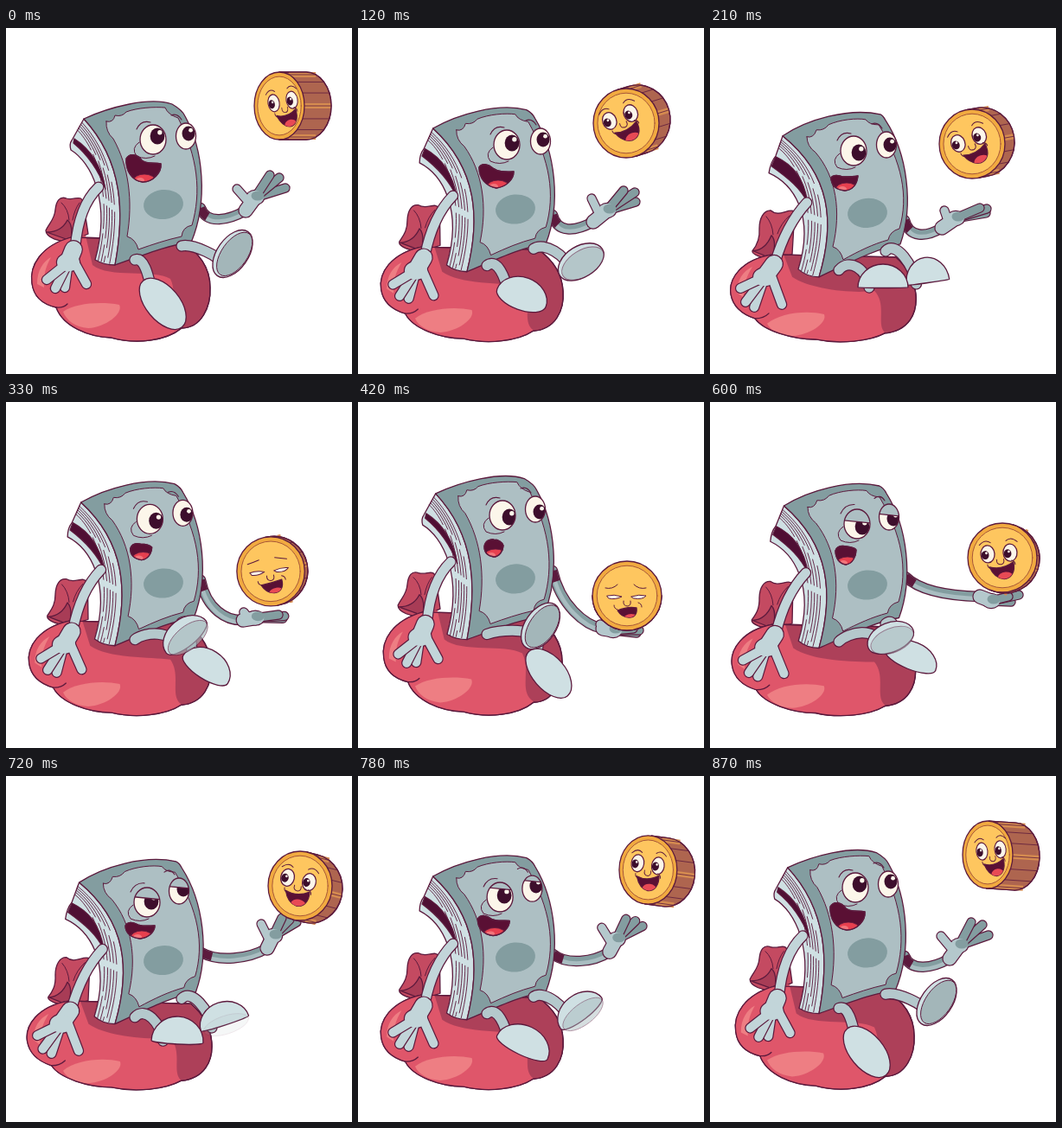
An HTML page that plays this animation: 400x400 px, repeating every 900 ms.

```html
<!DOCTYPE html>
<html>
<head>
<meta charset="utf-8">
<style>
html, body { margin: 0; width: 100%; height: 100%; overflow: hidden; background: #fff; }
svg { display: block; width: 100vw; height: 100vh; }
</style>
</head>
<body>
<svg id="stage" viewBox="0 0 400 400" stroke-linecap="round" stroke-linejoin="round"></svg>
<script>
const LOOP = 900, STEP = 30;
const INK = '#5c1a3d', DARK = '#839da0', MID = '#adbfc3', LIGHT = '#cfe0e3', SHADE = '#a3b6b9';
const TIMES = [0, 120, 210, 420, 600, 720, 870];
const stage = document.getElementById('stage');
const nums = s => s.match(/-?\d+(\.\d+)?/g).map(Number);

// Blend two paths of the same structure
function mix(a, b, k) {
  const to = nums(b);
  let i = 0;
  return a.replace(/-?\d+(\.\d+)?/g, n => (+n + (to[i++] - n) * k).toFixed(2));
}

// Cyclic smooth curve through one value per entry in TIMES, without overshoot
function curve(v, t) {
  const n = TIMES.length;
  const at = i => v[(i + n) % n];
  const when = i => TIMES[(i + n) % n] + LOOP * Math.floor(i / n);
  const slope = i => (at(i + 1) - at(i)) / (when(i + 1) - when(i));
  const tangent = i => {
    const a = slope(i - 1), b = slope(i);
    return a * b <= 0 ? 0 : 2 * a * b / (a + b);
  };
  let i = n - 1;
  while (TIMES[i] > t) i--;
  const h = when(i + 1) - when(i), u = (t - when(i)) / h, w = 1 - u;
  return at(i) * w * w * (1 + 2 * u) + at(i + 1) * u * u * (3 - 2 * u)
    + h * u * w * (tangent(i) * w - tangent(i + 1) * u);
}
const pose = (rows, t) => rows[0].map((_, c) => curve(rows.map(r => r[c]), t));

const path = (d, fill = 'none', stroke = INK, w = 1.3, more = '') =>
  `<path d="${d}" fill="${fill}" stroke="${stroke}" stroke-width="${w}" ${more}/>`;
const oval = (x, y, rx, ry, fill, stroke = 'none', w = 1.3, more = '') =>
  `<ellipse cx="${x}" cy="${y}" rx="${rx}" ry="${ry}" fill="${fill}" stroke="${stroke}" stroke-width="${w}" ${more}/>`;
const limb = (d, w, fill) => path(d, 'none', INK, w + 2.4) + path(d, 'none', fill, w);

// Resting and squashed shapes: [up, down]
const BODY = {
  face: ['M90,105 C118,92 165,79 192,88 Q204,95 207,102 C228,140 234,200 214,248 C190,250 160,262 126,274 C137,215 136,155 90,105 Z',
    'M84,125 C112,106 160,92 197,100 Q200,101 203,107 C228,145 236,205 220,250 C190,256 160,272 126,288 C145,225 140,170 84,125 Z'],
  panel: ['M116,108 Q124,110 126,101 Q134,103 139,97 C152,92 172,91 184,92 Q187,100 199,104 C222,150 226,190 215,228 Q204,230 203,241 C185,245 170,250 153,256 Q150,244 140,241 C147,200 142,160 124,128 Q115,120 116,108 Z',
    'M112,126 Q120,128 123,118 Q132,119 137,112 C150,106 170,104 180,106 Q184,112 195,112 C222,155 230,195 219,232 Q208,235 206,245 C188,250 172,258 154,268 Q151,256 142,253 C152,212 146,172 122,144 Q112,137 112,126 Z'],
  pages: ['M90,105 L76,130 Q73,134 75,141 C98,155 122,200 103,268 Q113,274 126,274 C137,215 136,155 90,105 Z',
    'M84,125 L76,148 Q70,155 68,168 C95,180 122,215 102,279 Q112,288 126,288 C145,225 140,170 84,125 Z'],
  gap: ['M79,128 C96,139 110,158 115,186 C107,165 95,147 78,133 Z',
    'M76,149 C95,158 108,172 113,202 C104,185 92,175 71,160 Z'],
  left: ['M82,119 C100,136 124,190 105,269', 'M79,140 C104,160 124,215 104,281'],
  right: ['M89,107 C130,152 135,210 123,273', 'M83,127 C135,168 141,220 122,287'],
  bag: ['M75,242 C40,252 27,275 30,295 C32,312 45,320 58,323 C66,345 95,357 122,358 C150,366 185,362 203,347 C226,347 237,322 236,300 C236,275 222,258 200,245 Z',
    'M72,262 C36,268 21,290 24,308 C27,325 40,332 52,336 C62,350 95,360 122,360 C150,366 185,362 202,353 C230,350 240,330 238,308 C236,290 226,275 215,265 Z'],
  front: ['M75,242 C40,252 27,275 30,295 C32,312 45,320 58,323 C66,345 95,357 122,358 C150,365 185,361 203,346 C185,335 200,310 190,290 C170,278 120,290 100,274 L92,240 Z',
    'M72,262 C36,268 21,290 24,308 C27,325 40,332 52,336 C62,350 95,360 122,360 C150,366 185,362 202,352 C192,342 205,320 190,304 C165,308 115,302 95,288 L85,262 Z'],
  shine: ['M66,328 C80,318 110,316 131,320 C136,330 115,346 95,347 C80,346 70,338 66,328 Z',
    'M66,342 C80,330 110,326 132,331 C136,341 115,355 95,356 C80,355 70,350 66,342 Z'],
  glint: ['M36,296 C36,280 43,270 52,265 C46,276 43,285 44,300 Z', 'M31,306 C31,292 38,281 49,276 C42,288 38,297 39,312 Z'],
  crease: ['M58,323 Q66,324 71,319', 'M52,336 Q62,336 68,330'],
  knot: ['M75,247 C62,248 46,242 46,234 C50,225 56,222 57,210 C58,200 62,194 70,197 C80,200 88,190 90,205 L95,238 Z',
    'M72,268 C60,266 48,262 49,258 C54,252 58,245 57,232 C57,220 62,211 70,211 C80,220 90,208 98,212 L95,262 Z'],
  fold: ['M47,236 C58,236 66,232 71,222 C76,226 77,234 75,246 Z', 'M50,258 C60,257 67,250 71,240 C76,245 75,254 72,267 Z'],
  pleat: ['M64,202 Q72,209 73,222 M85,202 Q79,210 77,222', 'M65,218 Q72,226 73,239 M92,217 Q82,226 78,238'],
  arm: ['M107,184 Q84,206 80,254', 'M112,202 Q88,228 75,272']
};
const REST = ['78,256 72,271 47,291 57,301 68,300 93,296', '74,273 63,288 35,301 41,317 51,323 83,320'];

// eye x, y, pupil x, y for both eyes, then lid
const LOOK = [
  [170, 129, 175, 125, 208, 125, 211, 122, 0], [172, 135, 178, 133, 211, 131, 214, 129, 0],
  [166, 142, 172, 144, 204, 135, 208, 135, 0], [167, 131, 175, 133, 205, 124, 210, 127, 0],
  [170, 141, 176, 144, 207, 133, 212, 135, .42], [163, 146, 168, 145, 200, 133, 205, 131, .36],
  [168, 129, 173, 125, 206, 125, 209, 122, 0]
];
const MOUTH = [
  'M139,151 C143,144 152,146 157,153 C163,158 171,155 179,157 C180,167 170,178 158,178 C146,177 138,165 139,151 Z',
  'M140,161 C143,156 150,157 156,162 C163,167 171,166 180,166 C180,176 170,184 160,185 C148,183 140,174 140,161 Z',
  'M140,173 C143,169 148,170 154,172 C160,172 166,172 171,171 C170,180 166,187 156,188 C146,187 140,182 140,173 Z',
  'M146,167 C147,161 152,158 157,159 C162,159 167,162 168,166 C168,172 163,179 157,179 C150,178 146,174 146,167 Z',
  'M145,172 C147,166 153,166 158,167 C163,168 167,168 169,171 C169,178 165,187 157,188 C150,187 145,181 145,172 Z',
  'M138,173 C141,168 147,169 153,172 C160,174 166,173 172,173 C172,180 165,187 155,188 C145,187 138,182 138,173 Z',
  'M139,151 C143,144 152,146 157,153 C163,158 171,155 179,157 C180,167 170,178 158,178 C146,177 138,165 139,151 Z'
];
// shoulder, two controls
const REACH = [
  [225, 208, 232, 228, 258, 222], [225, 216, 230, 237, 250, 236], [225, 222, 230, 243, 250, 242],
  [225, 195, 234, 235, 262, 258], [226, 202, 242, 218, 275, 224], [226, 204, 245, 215, 280, 212],
  [225, 208, 232, 227, 258, 222]
];
// wrist, palm, three finger tips, thumb
const GRIP = [
  [277, 211, 288, 196, 305, 170, 316, 173, 323, 185, 267, 186],
  [272, 224, 288, 211, 307, 188, 320, 190, 321, 201, 270, 197],
  [268, 231, 284, 220, 312, 208, 320, 209, 319, 214, 271, 211],
  [283, 262, 295, 264, 318, 262, 325, 264, 322, 267, 280, 257],
  [312, 225, 325, 230, 345, 225, 357, 223, 348, 231, 311, 223],
  [302, 199, 309, 185, 319, 164, 328, 166, 336, 169, 295, 171],
  [277, 211, 288, 196, 302, 169, 315, 172, 322, 184, 267, 185]
];
// x, y, angle, half length, top bulge, bottom bulge, sole
const FOOT_A = [
  [181, 319, 50, 35, 20, 19, 0], [189, 312, 20, 30, 24, 14, 0], [200, 300, 0, 29, 27, 0, 0],
  [211, 259, -56, 30, 18, 18, 1], [209, 274, -22, 28, 19, 15, .5], [198, 307, 3, 30, 29, 3, 0],
  [181, 319, 50, 35, 20, 19, 0]
];
const FOOT_B = [
  [262, 261, -55, 31, 18, 18, 1], [258, 271, -32, 29, 19, 17, .6], [252, 294, -8, 25, 29, 0, 0],
  [220, 314, 49, 34, 20, 18, 0], [232, 299, 22, 31, 22, 10, 0], [253, 286, -18, 29, 25, 2, .1],
  [262, 261, -55, 31, 18, 18, 1]
];
// face x, y, rx, ry, edge dx, dy, eye midpoint x, y, tilt, closed
const COIN = [
  [316, 90, 29, 39, 31, 0, 320, 85, -10, 0], [310, 110, 38, 40, 13, -4, 303, 103, -20, 0],
  [303, 134, 38, 40, 11, -2, 299, 129, -20, 0], [311, 224, 40, 40, 0, 0, 310, 223, 0, 1],
  [338, 180, 40, 40, 3, 1, 334, 175, -4, 0], [340, 127, 37, 40, 12, 3, 338, 120, 12, 0],
  [321, 91, 29, 39, 31, 2, 325, 86, -6, 0]
];

function eye(id, x, y, rx, ry, px, py, pr, lid, skin) {
  const top = y - ry + 2 * ry * lid;
  const cover = lid > .02 ? path(`M${x - 30},${y - 40} H${x + 30} V${top + 3} L${x - 30},${top - 3} Z`, skin) : '';
  return `<clipPath id="${id}">${oval(x, y, rx, ry, '#000')}</clipPath>`
    + oval(x, y, rx, ry, '#fcf6ea')
    + `<g clip-path="url(#${id})">${oval(px, py, pr * .88, pr, '#3d0e2c')}`
    + oval(px + pr * .3, py - pr * .45, pr * .28, pr * .28, '#fcf6ea') + cover + '</g>'
    + oval(x, y, rx, ry, 'none', INK);
}

function hand(p, r, w, fill, back) {
  const [wx, wy, x, y] = p;
  const line = i => `M${x},${y} L${p[i]},${p[i + 1]}`;
  const wrist = `M${wx},${wy} L${x},${y}`, thumb = `M${(wx + x) / 2},${(wy + y) / 2} L${p[10]},${p[11]}`;
  const fingers = [8, 6, 4].map(i => limb(line(i), w, fill)).join('');
  return path(wrist, 'none', INK, r * 1.5 + 2.4) + oval(x, y, r, r * .8, INK, INK, 2.4) + fingers
    + limb(thumb, w, back) + path(wrist, 'none', back, r * 1.5) + oval(x, y, r, r * .8, back)
    + (fill === back ? '' : oval(x + 3, y - 2, r * .75, r * .55, fill));
}

function foot([x, y, a, l, top, low, sole]) {
  const d = `M${-l},0 A${l},${top} 0 0 1 ${l},0 A${l},${Math.max(low, .5)} 0 0 1 ${-l},0 Z`;
  return `<g transform="translate(${x} ${y}) rotate(${a})">${path(d, LIGHT)}`
    + oval(1, 2, l - 2, Math.max(1, (top + low) / 2 - 3), SHADE, INK, .9, `opacity="${sole}"`) + '</g>';
}

function leg(hx, hy, lift, f) {
  const r = f[2] * Math.PI / 180, k = f[3] * .55;
  const ax = f[0] - Math.cos(r) * k, ay = f[1] - Math.sin(r) * k;
  return limb(`M${hx},${hy} C${hx + 12},${hy - lift} ${ax - 3},${ay - lift - 8} ${ax},${ay}`, 11, '#b4c8cc');
}

function coin(t) {
  const [x, y, rx, ry, ex, ey, fx, fy, tilt, shut] = pose(COIN, t);
  const a = Math.atan2(-ry * ex, rx * ey);
  const rim = q => [x + rx * Math.cos(q), y + ry * Math.sin(q)];
  const [ax, ay] = rim(a), [bx, by] = rim(a + Math.PI);
  const edge = `M${ax},${ay} L${ax + ex},${ay + ey} A${rx},${ry} 0 0 1 ${bx + ex},${by + ey} L${bx},${by} Z`;
  let ribs = '';
  for (let i = 1; i < 8; i++) {
    const [px, py] = rim(a + i * Math.PI / 8);
    const d = `M${px},${py} l${ex},${ey}`;
    if (i % 3 === 1) ribs += path(d, 'none', '#d58b50', 6, 'stroke-linecap="butt"');
    ribs += path(d, 'none', INK, .8);
  }
  const gold = '#fec65f', s = .82 + .18 * Math.min(1, (rx - 29) / 9);
  const eyes = shut > .6
    ? path('M-22,1 Q-14,-1 -5,2 Q-13,6 -20,4 Z M6,2 Q15,-1 23,1 Q19,6 9,4 Z', '#fcf6ea', INK, 1)
    : eye('c1', -13, 0, 8, 10, -16, 1, 5, shut * .8, gold) + eye('c2', 13, 0, 8, 10, 10, 1, 5, shut * .8, gold);
  const grin = mix('M-12,15 Q2,20 16,11 C18,23 12,30 4,30 C-4,29 -9,23 -12,15 Z',
    'M-10,18 Q2,13 12,15 C13,22 9,27 3,26 C-3,26 -7,23 -10,18 Z', shut);
  return path(edge, '#ae654f') + ribs + path(edge)
    + oval(x, y, rx, ry, '#f1aa40', INK) + oval(x, y, rx * .87, ry * .87, gold, '#a75638', 1)
    + `<g transform="translate(${fx} ${fy}) rotate(${tilt}) scale(${s} 1)">${eyes}`
    + path(mix('M-22,-11 Q-15,-18 -9,-13 M9,-14 Q15,-19 22,-12', 'M-24,-8 Q-16,-6 -10,-12 M9,-12 Q15,-6 23,-8', shut), 'none', INK, 1)
    + path('M-3,7 Q-4,13 2,13 Q6,12 5,7', gold, INK, 1)
    + `<clipPath id="grin"><path d="${grin}"/></clipPath>` + path(grin, '#5a1034')
    + oval(6, 28, 9, 6, '#e84a55', 'none', 1, 'clip-path="url(#grin)"')
    + path('M-14,12 Q-14,16 -10,17 M14,9 Q18,10 18,14', 'none', INK, 1) + '</g>';
}

function draw(t) {
  const b = (1 - Math.cos(4 * Math.PI * t / LOOP)) / 2;
  const part = n => mix(BODY[n][0], BODY[n][1], b);
  const [lx, ly, px, py, rx, ry, qx, qy, lid] = pose(LOOK, t);
  const mouthNums = pose(MOUTH.map(nums), t);
  let i = 0;
  const mouth = MOUTH[0].replace(/\d+/g, () => mouthNums[i++].toFixed(2));
  const [tx, ty] = mouthNums.slice(18, 20);
  const grip = pose(GRIP, t), r = pose(REACH, t);
  const reach = `M${r[0]},${r[1]} C${r[2]},${r[3]} ${r[4]},${r[5]} ${grip[0]},${grip[1]}`;
  const fa = pose(FOOT_A, t), fb = pose(FOOT_B, t);
  const left = part('left'), right = part('right');
  const sheets = [.08, .28, .46, .64, .82].map((k, n) =>
    path(mix(left, right, k), 'none', INK, .9, `stroke-dasharray="${28 + n * 9} ${6 + n * 2} ${50 - n * 6} 9"`)).join('');
  const face = part('face');

  stage.innerHTML =
    path(part('knot'), '#c44a61') + path(part('fold'), '#a83c56') + path(part('pleat'), 'none', INK, 1)
    + path(part('bag'), '#ad4059') + path(part('front'), '#df566a', 'none')
    + path(part('shine'), '#ee7e83', 'none') + path(part('glint'), '#ee7e83', 'none')
    + path(part('bag')) + path(part('crease'))
    + limb(reach, 10, DARK)
    + path(reach, 'none', '#a9bdc1', 4.5, 'transform="translate(0 2.4)"')
    + path(reach, 'none', INK, 10, 'stroke-dasharray="13 999" stroke-linecap="butt"')
    + hand(grip, 10, 9, DARK, '#b4c8cc')
    + path(part('pages'), LIGHT) + sheets + path(part('gap'), '#4f0f34')
    + path(face, DARK) + path(part('panel'), MID, INK, 1)
    + oval(182, 204 + 10 * b, 23, 17, DARK, 'none', 1, `transform="rotate(-6 182 ${204 + 10 * b})"`)
    + path(`M${lx - 19},${ly - 12} Q${lx - 14},${ly - 23} ${lx - 3},${ly - 20 - lid * 6} M${rx - 17},${ry - 24 + lid * 6} Q${rx - 10},${ry - 27} ${rx - 5},${ry - 19}`, 'none', INK, 1.1)
    + path(`M${lx - 16},${ly + 3} Q${lx - 26},${ly + 10} ${lx - 19},${ly + 19} Q${lx - 8},${ly + 24} ${lx + 2},${ly + 19}`, 'none', INK, 1)
    + eye('e1', lx, ly, 15, 17, px, py, 9.5, lid, MID) + eye('e2', rx, ry, 11.5, 15, qx, qy, 8.5, lid, MID)
    + `<clipPath id="mouth"><path d="${mouth}"/></clipPath>` + path(mouth, '#5a1034')
    + oval(tx + 2, ty - 1, 13, 8, '#e7404f', INK, .8, 'clip-path="url(#mouth)"')
    + oval(tx - 3, ty - 2, 5, 3, '#f2757b', 'none', 1, 'clip-path="url(#mouth)"') + path(mouth)
    + leg(203, 252 + 6 * b, 3 + 10 * b, fb) + foot(fb)
    + leg(149, 268 + 12 * b, 4 + 10 * b, fa) + foot(fa)
    + limb(part('arm'), 10.5, '#c2d5d9')
    + hand(nums(mix(REST[0], REST[1], b)), 13, 10, '#c2d5d9', '#c2d5d9')
    + coin(t);
}

let shown = -1;
const start = performance.now();
function tick(now) {
  const t = Math.floor((Math.max(0, now - start) % LOOP) / STEP) * STEP;
  if (t !== shown) draw(shown = t);
  requestAnimationFrame(tick);
}
tick(start);
</script>
</body>
</html>
```
